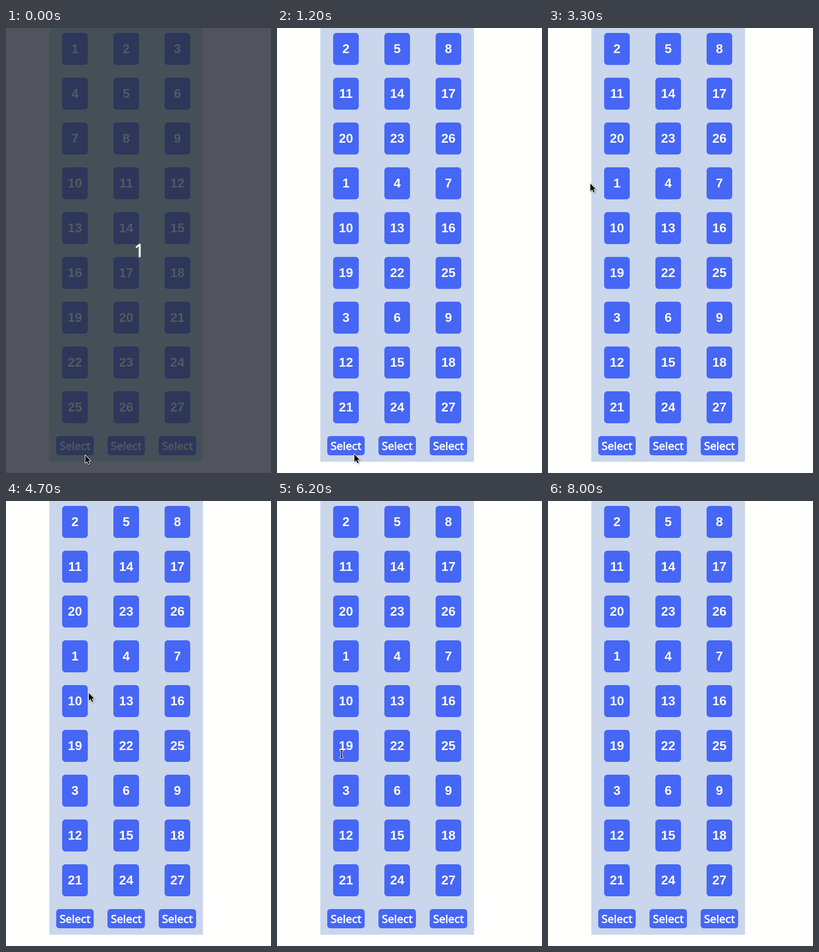
An HTML page that plays this animation: 538 px wide and 904 px high, repeating every 8200 ms.

```html
<!DOCTYPE html>
<html lang="en">
<head>
<meta charset="utf-8">
<title>Card grid</title>
<style>
  html, body { margin: 0; width: 100%; height: 100%; overflow: hidden; }
  svg {
    display: block;
    --bg: #fffffd; --panel: #c9d6ec; --card: #4666f6; --ink: #fffffd;
    background: var(--bg);
  }
  svg.dim { --bg: #51545c; --panel: #454f57; --card: #2d3759; --ink: #555861; }
  .panel { fill: var(--panel); }
  .card { fill: var(--card); }
  text { fill: var(--ink); text-anchor: middle; }
  .num { font: bold 26px "Liberation Sans", Arial, sans-serif; }
  .label { font: 22.6px "Noto Sans", "Open Sans", sans-serif; stroke: var(--ink); stroke-width: .8; }
  #count { font: 36px "Noto Sans", "Open Sans", sans-serif; fill: #fff; stroke: #fff; stroke-width: .8; }
  #intro { display: none; }
  .dim #intro { display: inline; }
  #cursor path { fill: #0a0a0c; stroke: #fff; stroke-width: 2; paint-order: stroke; stroke-linejoin: round; }
  #arrow { filter: drop-shadow(1px 1px 1px #0006); }
</style>
</head>
<body>
<svg id="stage" width="538" height="904" viewBox="0 0 538 904">
  <rect class="panel" x="88" width="312" height="881"/>
  <g id="grid"></g>
  <g id="intro">
    <path d="M0 903.5H538" stroke="#484b53"/>
    <path d="M536.5 4V904" stroke="#484b53" stroke-dasharray="2 6"/>
    <text id="count" x="270.5" y="465">1</text>
  </g>
  <g id="cursor">
    <path id="arrow" d="M0 1V16.5L3.7 13.2L6.2 19L8.7 17.9L6.2 12.3H11Z"/>
    <path id="beam" d="M-3-8H3V-6.5H1V6.5H3V8H-3V6.5H-1V-6.5H-3Z"/>
  </g>
</svg>
<script>
const LOOP = 8200, STEP = 100, SHUFFLE = 1200;
const $ = id => document.getElementById(id);
const stage = $('stage'), cursor = $('cursor');

// The cursor glides between two points, then rests; no points means hidden.
const glides = [
  { start: 0, end: 200, from: [161, 867], to: [157, 865] },
  { start: 2100 },
  { start: 2900, end: 3100, from: [39, 365], to: [65, 340] },
  { start: 3300, end: 3800, from: [86, 315], to: [198, 312] },
  { start: 4000, end: 4400, from: [226, 309], to: [355, 323] },
  { start: 4600, end: 4900, from: [266, 337], to: [127, 411] },
  { start: 5100, end: 5600, from: [160, 411], to: [340, 424] },
  { start: 5800, end: 6200, from: [341, 432], to: [131, 514] },
  { start: 6300, end: 6600, from: [137, 512], to: [189, 504] },
  { start: 7100, end: 7200, from: [268, 487], to: [347, 516] },
  { start: 7300 },
  { start: 7600, end: 7700, from: [28, 29], to: [39, -1] },
  { start: 8000 }
];

function add(tag, attrs, text = '') {
  const el = document.createElementNS('http://www.w3.org/2000/svg', tag);
  for (const key in attrs) el.setAttribute(key, attrs[key]);
  el.textContent = text;
  return $('grid').appendChild(el);
}

const colX = c => 140 + 104 * c;
const rowY = r => 42 + 91 * r;
const numbers = [];
for (let i = 0; i < 27; i++) {
  const x = colX(i % 3), y = rowY(Math.floor(i / 3));
  add('rect', { class: 'card', x: x - 26, y: y - 32, width: 52, height: 65, rx: 6.5 });
  numbers.push(add('text', { class: 'num', x, y: y + 9 }));
}
for (let c = 0; c < 3; c++) {
  add('rect', { class: 'card', x: colX(c) - 38, y: 829, width: 76, height: 39, rx: 6 });
  add('text', { class: 'label', x: colX(c), y: 857 }, 'Select');
}

// Columns are gathered in the order second, first, third.
const dealt = i => [2, 1, 3][Math.floor(i / 9)] + 3 * (i % 9);

function overNumber(x, y) {
  const c = Math.round((x - colX(0)) / 104), r = Math.round((y - rowY(0)) / 91);
  return c >= 0 && c < 3 && r < 9 &&
    Math.abs(x - colX(c)) <= 16 && Math.abs(y - rowY(r)) < 18;
}

function drawCursor(t) {
  const { start, end, from, to } = glides.findLast(g => g.start <= t);
  cursor.style.display = from ? '' : 'none';
  if (!from) return;
  const p = Math.min(1, Math.floor((t - start) / STEP) * STEP / (end - start));
  // Reading along a row is steady; the return to the left slows down.
  const ease = to[0] < from[0] ? 1 - (1 - p) ** 3 : p;
  const [x, y] = from.map((v, i) => Math.round(v + (to[i] - v) * ease));
  const beam = overNumber(x, y);
  cursor.setAttribute('transform', `translate(${x} ${y})`);
  $('beam').style.display = beam ? '' : 'none';
  $('arrow').style.display = beam ? 'none' : '';
}

function draw(t) {
  stage.classList.toggle('dim', t < STEP);
  numbers.forEach((el, i) => el.textContent = t < SHUFFLE ? i + 1 : dealt(i));
  drawCursor(t);
}

const began = performance.now();
function tick() {
  draw((performance.now() - began) % LOOP);
  requestAnimationFrame(tick);
}
tick();
</script>
</body>
</html>
```
